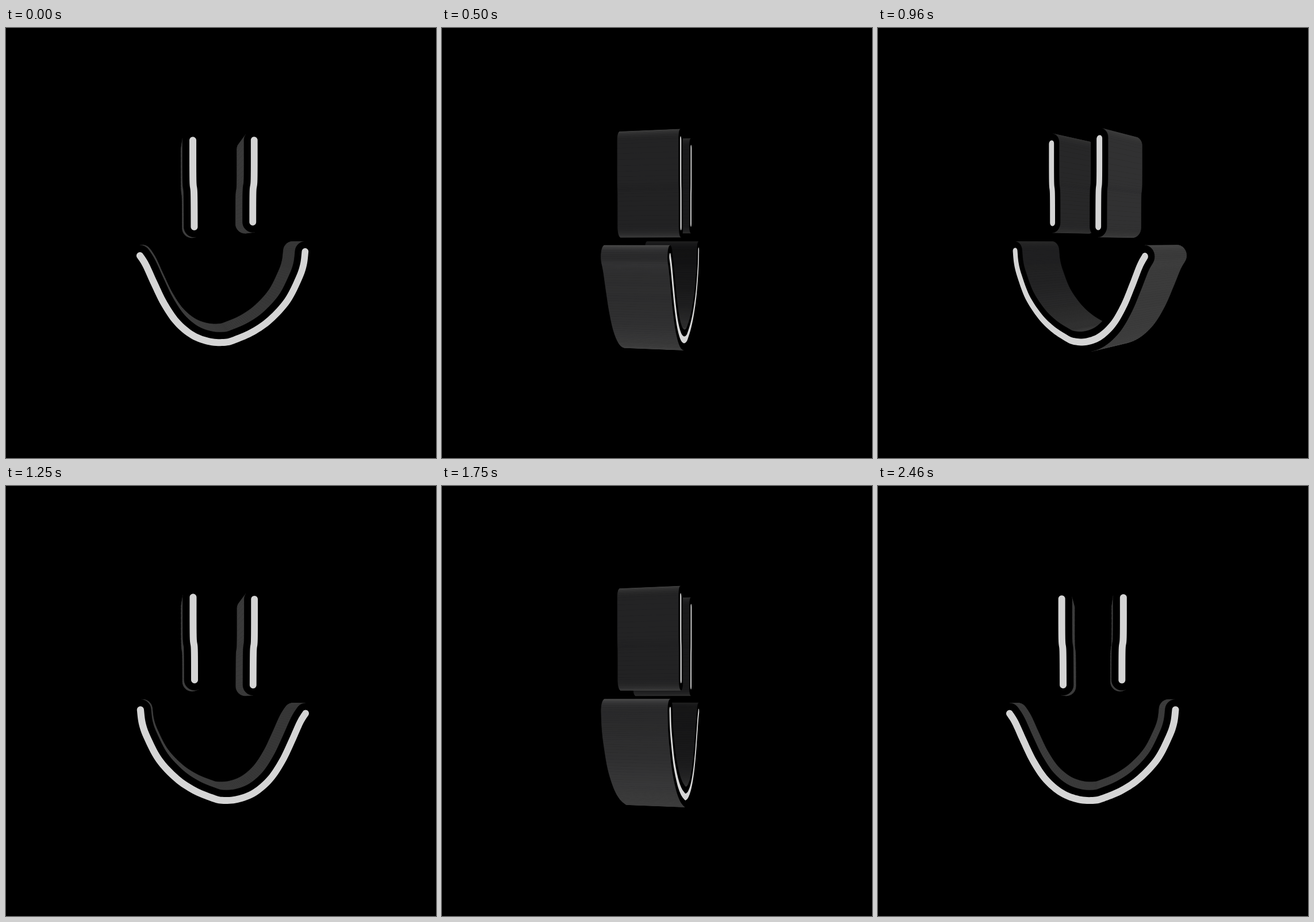
These frames come from a looping animation (748x748 px, 2.5 s). An HTML page with a canvas:

```html
<!DOCTYPE html>
<html lang="en">
<head>
<meta charset="utf-8">
<title>Spinning smile</title>
<style>
  html, body { margin: 0; width: 100%; height: 100%; overflow: hidden; background: #000; }
  canvas { display: block; }
</style>
</head>
<body>
<canvas id="stage" width="748" height="748"></canvas>
<script>
const ctx = document.getElementById('stage').getContext('2d');
const LOOP = 2500, MID = 374;
const CAMERA = 1060, DEPTH = 51.5;
const RIM = 17, STRIPE = 5.7;
const START = 5 * Math.PI / 180;

// Catmull-Rom value between b and c
function spline(a, b, c, d, t) {
  const k1 = c - a;
  const k2 = 2 * a - 5 * b + 4 * c - d;
  const k3 = 3 * (b - c) + d - a;
  return b + 0.5 * t * (k1 + t * (k2 + t * k3));
}

// Smooth curve through a few points
function curve(pts, steps = 8) {
  const out = [];
  const at = i => pts[Math.max(0, Math.min(pts.length - 1, i))];
  for (let i = 0; i < pts.length - 1; i++) {
    const a = at(i - 1), b = at(i), c = at(i + 1), d = at(i + 2);
    for (let s = 0; s < steps; s++) {
      out.push([0, 1].map(k => spline(a[k], b[k], c[k], d[k], s / steps)));
    }
  }
  out.push(at(pts.length));
  return out;
}

// Closed outline of a round-capped stroke, each point with its normal
function outline(line, r) {
  const last = line.length - 1;
  const angles = line.map((p, i) => {
    const a = line[Math.max(0, i - 1)], b = line[Math.min(last, i + 1)];
    return Math.atan2(b[1] - a[1], b[0] - a[0]) - Math.PI / 2;
  });
  const out = [];
  const add = (p, a) => {
    const nx = Math.cos(a), ny = Math.sin(a);
    out.push({ x: p[0] + r * nx, y: p[1] + r * ny, nx, ny });
  };
  const cap = (p, a) => {
    for (let k = 1; k < 16; k++) add(p, a + Math.PI * k / 16);
  };
  line.forEach((p, i) => add(p, angles[i]));
  cap(line[last], angles[last]);
  for (let i = last; i >= 0; i--) add(line[i], angles[i] + Math.PI);
  cap(line[0], angles[0] + Math.PI);
  return out;
}

function part(pts) {
  const line = curve(pts);
  return { x: pts[0][0], rim: outline(line, RIM), stripe: outline(line, STRIPE) };
}

const leftEye = part([[-51.2, -169.2], [-51, -103], [-49.3, -82], [-48.9, -26.6]]);
const rightEye = part([[50.8, -171], [50.6, -106], [48.7, -85], [48.4, -34.8]]);
const mouth = part([
  [-137.7, 20.7], [-128.3, 35.7], [-114.2, 66.8], [-98.3, 99.5], [-77.6, 130],
  [-51.2, 152.3], [-22.8, 163], [2.9, 164.4], [20.1, 159.8], [48.9, 147.4],
  [77.8, 127.6], [106.8, 96.2], [126.2, 59], [134, 36.5], [136.9, 14.4]
]);

let sin = 0, cos = 1;

function turn(x, y, z) {
  return [x * cos + z * sin, y, z * cos - x * sin];
}

function project(x, y, z) {
  const [px, py, pz] = turn(x, y, z);
  const m = CAMERA / (CAMERA - pz);
  return [MID + px * m, MID + py * m];
}

function fill(points, color, seam) {
  ctx.beginPath();
  points.forEach(p => ctx.lineTo(p[0], p[1]));
  ctx.closePath();
  ctx.fillStyle = color;
  ctx.fill();
  if (seam) {
    ctx.strokeStyle = color;
    ctx.lineWidth = 0.7;
    ctx.lineJoin = 'round';
    ctx.stroke();
  }
}

function drawWalls(rim) {
  const quads = [];
  rim.forEach((a, i) => {
    const b = rim[(i + 1) % rim.length];
    const [nx, ny, nz] = turn((a.nx + b.nx) / 2, (a.ny + b.ny) / 2, 0);
    const [x, y, z] = turn((a.x + b.x) / 2, (a.y + b.y) / 2, 0);
    const vz = CAMERA - z;
    const facing = (vz * nz - x * nx - y * ny) / Math.hypot(x, y, vz);
    if (facing > 0) quads.push({ a, b, z, facing });
  });
  quads.sort((p, q) => p.z - q.z);
  for (const { a, b, z, facing } of quads) {
    // Brighter at grazing angles, darker far away
    const g = Math.round((63 - 35 * facing) * (1 + z / 350));
    fill([
      project(a.x, a.y, DEPTH), project(b.x, b.y, DEPTH),
      project(b.x, b.y, -DEPTH), project(a.x, a.y, -DEPTH)
    ], `rgb(${g}, ${g}, ${g + Math.round(facing)})`, true);
  }
}

function drawPart({ rim, stripe }) {
  drawWalls(rim);
  if (Math.abs(CAMERA * cos) <= DEPTH) return;
  const z = cos > 0 ? DEPTH : -DEPTH;
  const face = pts => pts.map(p => project(p.x, p.y, z));
  fill(face(rim), '#000', true);
  fill(face(stripe), '#d5d5d5');
}

function frame(now) {
  const angle = START + 2 * Math.PI * (now % LOOP) / LOOP;
  sin = Math.sin(angle);
  cos = Math.cos(angle);
  ctx.fillStyle = '#000';
  ctx.fillRect(0, 0, 748, 748);
  drawPart(mouth);
  [leftEye, rightEye].sort((a, b) => (b.x - a.x) * sin).forEach(drawPart);
}

const begin = performance.now();
function tick() {
  frame(performance.now() - begin);
  requestAnimationFrame(tick);
}
tick();
</script>
</body>
</html>
```
